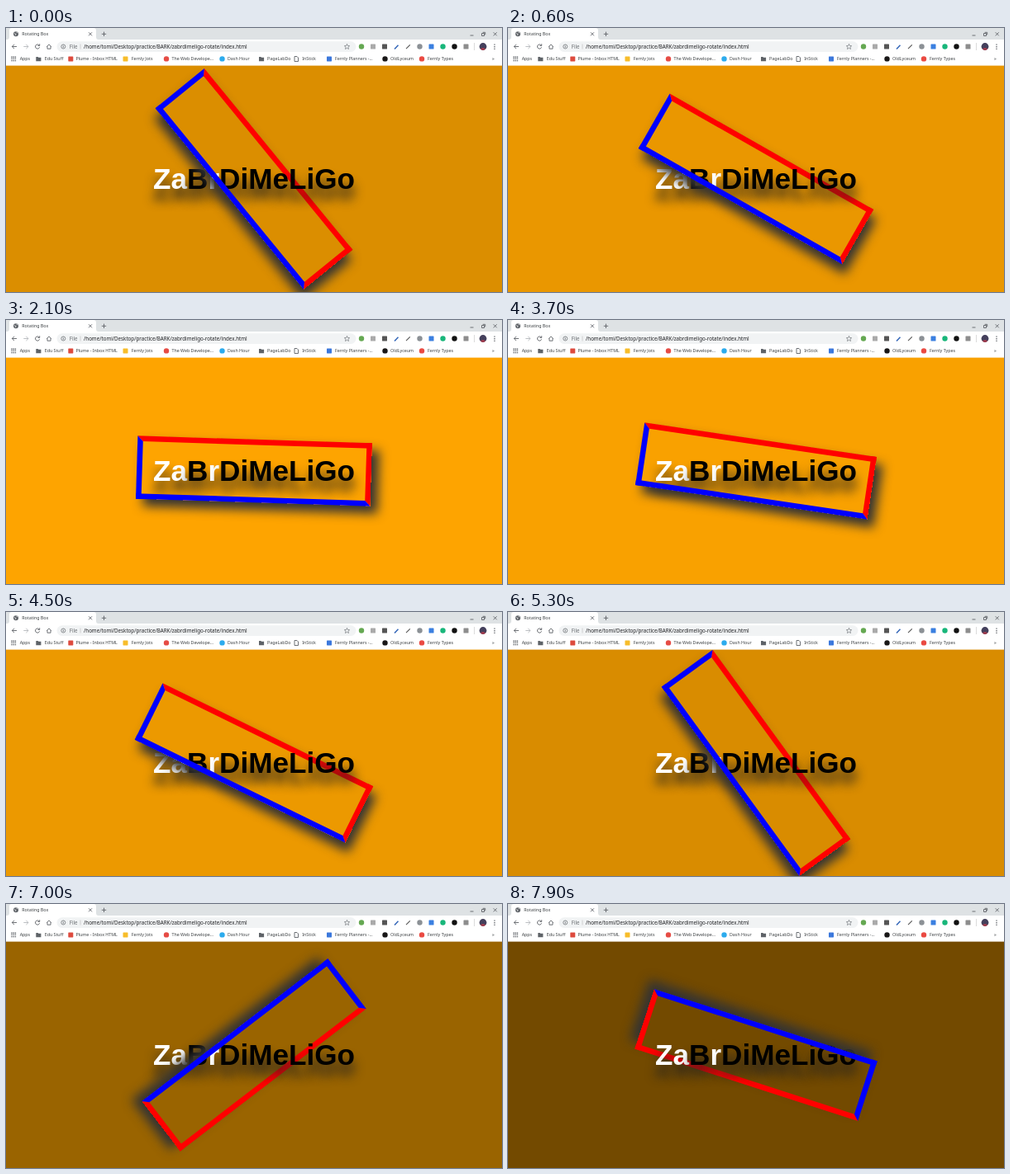
Recreate the animation shown at these times as an HTML page. Size 600x320 px, loop 8 s.

```html
<!DOCTYPE html>
<html lang="en">
<head>
<meta charset="utf-8">
<title>Rotating Box</title>
<style>
  html, body { margin: 0; width: 100%; height: 100%; overflow: hidden; }
  #stage { position: absolute; width: 600px; height: 320px; overflow: hidden; background: orange; }
  /* laid out for a 1366px wide page, scaled down with the transform */
  .box {
    position: absolute; left: 299.6px; top: 182.9px; width: 646px; height: 174px;
    margin: -87px 0 0 -323px; box-sizing: border-box; border: 15px solid transparent;
  }
  .back { border-top-color: red; border-right-color: red; }
  .front {
    border-bottom-color: blue; border-left-color: blue;
    box-shadow: 20px 20px 30px #333;
  }
  #word {
    position: absolute; left: 0; top: 163px; width: 600px; text-align: center;
    font: bold 35.14px/40px "Liberation Sans", Arial, sans-serif;
    text-shadow: 0 13px 13px #222; white-space: nowrap;
  }
  #word b { color: #fff; }
  #chrome { position: absolute; left: 0; top: 0; }
  #chrome text { font: 5.3px "Noto Sans", sans-serif; fill: #3c4043; }
  #chrome .url { font-size: 6.2px; fill: #202124; }
  .line { fill: none; stroke: #5f6368; stroke-width: .9; }
</style>
</head>
<body>
<div id="stage">
  <div class="box back"></div>
  <div id="word"><b>Za</b>B<b>r</b>DiMeLiGo</div>
  <div class="box front"></div>
  <svg id="chrome" width="600" height="46" viewBox="0 0 600 46">
    <rect width="600" height="45.6" fill="#fff"/>
    <path d="M0 0H600V14H112Q109 14 109 11V3Q109 0 106 0H7Q4 0 4 3V11Q4 14 1 14H0Z" fill="#dee2e4"/>
    <!-- tab strip -->
    <circle cx="12" cy="7.3" r="3" fill="#5f6368"/>
    <path d="M10 6.5l2 1l-.5 1.5M12.5 5l1.5 1" stroke="#fff" stroke-width=".7" fill="none"/>
    <text x="19.3" y="9.3">Rotating Box</text>
    <path class="line" d="M100 5.3l4 4m0-4l-4 4M115.8 7.3h5.4m-2.7-2.7v5.4"/>
    <path class="line" d="M561.5 9h4M575.5 6.5h3v3h-3zM576.7 5.3h3v3M589.7 5.3l4 4m0-4l-4 4"/>
    <!-- toolbar -->
    <path class="line" d="M13 22.5H7.3M10 19.8l-2.7 2.7l2.7 2.7"/>
    <path class="line" style="stroke:#b5b8bb" d="M21.3 22.5H27M24.3 19.8l2.7 2.7l-2.7 2.7"/>
    <path class="line" d="M40.2 21A2.6 2.6 0 1 0 40.6 23.3M40.7 19.3v2.2h-2.2"/>
    <path class="line" d="M49 22.8l3-2.8l3 2.8M50 22.3v2.9h4v-2.9"/>
    <rect x="61.5" y="16.3" width="362" height="12.6" rx="6.3" fill="#f1f3f4"/>
    <circle class="line" cx="69.3" cy="22.5" r="2.5" style="stroke-width:.7"/>
    <path class="line" d="M69.3 22v1.7M69.3 20.8v.6"/>
    <text class="url" x="76.7" y="24.7" style="fill:#6b6f73">File</text>
    <path d="M90 19.5v6" stroke="#bbb" stroke-width=".6"/>
    <text class="url" x="94" y="24.7">/home/tomi/Desktop/practice/BARK/zabrdimeligo-rotate/index.html</text>
    <path class="line" style="stroke-width:.6" d="M412.5 19.4l.9 2.1l2.3.2l-1.7 1.5l.5 2.3l-2-1.2l-2 1.2l.5-2.3l-1.7-1.5l2.3-.2z"/>
    <path d="M566.5 18v9" stroke="#ccc" stroke-width=".7"/>
    <g id="icons"></g>
    <path d="M470 25.5l4.5-4.8" stroke="#3366b8" stroke-width="1.5"/>
    <path d="M484 25.2l4.8-4.8" stroke="#555" stroke-width="1.1"/>
    <circle cx="577" cy="22.5" r="4.4" fill="#44405c"/>
    <path d="M573.8 25.5a4.4 4.4 0 0 0 6.4 0q-3.2-3-6.4 0" fill="#a33a4c"/>
    <path d="M591 19.5v6.5" stroke="#5f6368" stroke-width="1.3" stroke-dasharray="1.3 1.3"/>
    <!-- bookmarks -->
    <path d="M6.3 35.2h6M6.3 37.4h6M6.3 39.6h6" stroke="#5f6368" stroke-width="1.4" stroke-dasharray="1.4 .8"/>
    <g id="marks"></g>
    <path d="M349 34.5h3l1.5 1.5v4.5H349z" class="line"/>
    <text x="588" y="39">»</text>
  </svg>
</div>
<script>
const $ = q => document.querySelector(q);
const dot = (x, y, color, r = 3.2) => `<circle cx="${x}" cy="${y}" r="${r}" fill="${color}"/>`;
const square = (x, y, color, s = 6) =>
  `<rect x="${x - s / 2}" y="${y - s / 2}" width="${s}" height="${s}" rx=".6" fill="${color}"/>`;
const folder = (x, y) =>
  `<path d="M${x - 3} ${y - 2.5}h2.3l.8.8h3v4.5h-6.1z" fill="#5f6368"/>`;

// [icon, icon x, colour, text x, label]
const marks = [
  [null, 0, '', 16.7, 'Apps'],
  [folder, 39.3, '', 46.7, 'Edu Stuff'],
  [square, 78.3, '#dd4b3e', 84.5, 'Plume - Inbox HTML'],
  [square, 144.5, '#f7bd2b', 151.7, 'Fernly Jots'],
  [dot, 194, '#e64c45', 200.5, 'The Web Develope...'],
  [dot, 261.5, '#2cabed', 268, 'Dash Hour'],
  [folder, 309, '', 316, 'PageLabDo'],
  [null, 0, '', 358.3, 'InStick'],
  [square, 391, '#3c78dc', 398, 'Fernly Planners -...'],
  [dot, 458.5, '#191717', 465, 'OldLyceum'],
  [dot, 503, '#ea4a42', 510, 'Fernly Types']
];
$('#marks').innerHTML = marks.map(([icon, x, color, tx, label]) =>
  (icon ? icon(x, 37.4, color) : '') + `<text x="${tx}" y="39.3">${label}</text>`).join('');

$('#icons').innerHTML =
  [[dot, 430, '#65a852'], [square, 444, '#aaa'], [square, 458, '#555'],
   [dot, 500.5, '#8b9095'], [square, 514.5, '#3a7fe0'], [dot, 528.5, '#18b67a'],
   [dot, 542.5, '#111'], [square, 556.5, '#8d8d8d']]
  .map(([icon, x, color]) => icon(x, 22.5, color)).join('');

// cubic-bezier(.42, 0, .58, 1)
function easeInOut(x) {
  let s = x;
  for (let i = 0; i < 8; i++)
    s -= (s * (1.26 - s * (.78 - .52 * s)) - x) / (1.26 - 1.56 * s + 1.56 * s * s);
  return s * s * (3 - 2 * s);
}

const LOOP = 8000, STEP = 100, TURN = 2610, SPIN = 10000, SCALE = 600 / 1366;
const stage = $('#stage'), boxes = document.querySelectorAll('.box');

function draw() {
  const t = Math.floor(performance.now() % LOOP / STEP) * STEP;
  const p = easeInOut(Math.abs(t - TURN) / SPIN);
  for (const box of boxes) box.style.transform = `scale(${SCALE}) rotate(${360 * p}deg)`;
  stage.style.backgroundColor = `rgb(${255 * (1 - p)}, ${165 * (1 - p)}, 0)`;
  requestAnimationFrame(draw);
}
draw();
</script>
</body>
</html>
```
